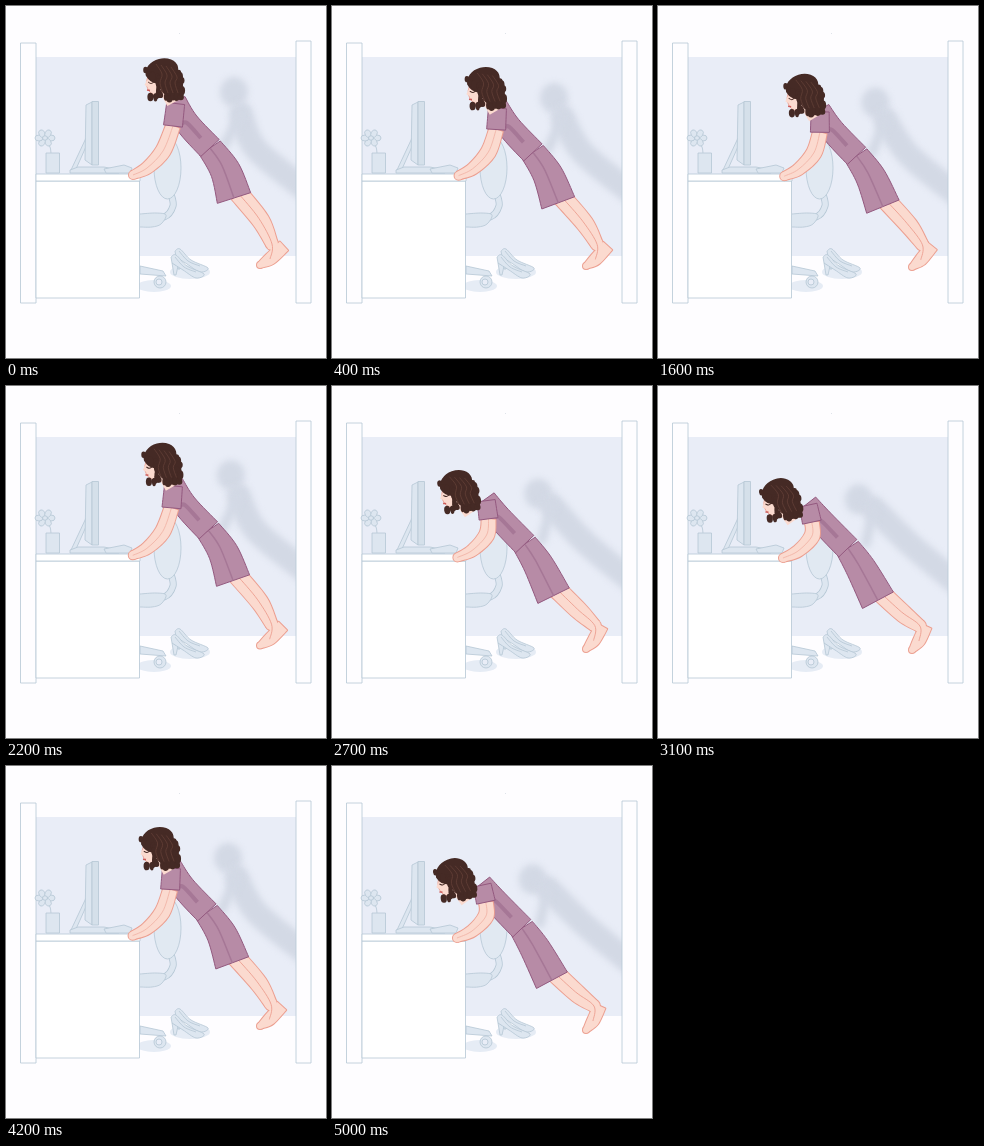
Write an HTML page with a canvas that moves like this. It is 320 by 352 pixels and loops after 5100 ms.

```html
<!DOCTYPE html>
<html lang="en">
<head>
<meta charset="utf-8">
<title>Desk push-ups</title>
<style>
html, body { margin: 0; width: 100%; height: 100%; overflow: hidden; background: #fefdff; }
canvas { display: block; width: 320px; height: 352px; }
</style>
</head>
<body>
<canvas id="stage"></canvas>
<script>
const canvas = document.getElementById('stage');
const ctx = canvas.getContext('2d');
const ratio = window.devicePixelRatio || 1;
canvas.width = 320 * ratio;
canvas.height = 352 * ratio;

const LOOP = 5100, STEP = 100, CYCLE = 1900, DOWN = 1100;
const PAPER = '#fefdff', WALL = '#e9edf7', LINE = '#b5c7d5', PALE = '#dde6f0';
const SKIN = '#fbdacf', SKIN_LINE = '#ec9f90';
const DRESS = '#b78ba6', DRESS_DARK = '#a67796', DRESS_LINE = '#93597f';
const HAIR = '#452a25', HAIR_LIGHT = '#664239';

// Each joint at the top and at the bottom of the push-up
const JOINTS = {
  collar: [[170, 95], [150, 117]],
  chest: [[181, 117], [164, 135]],
  waist: [[204, 142], [190, 162]],
  hip: [[219, 164], [203, 182]],
  hem: [[228, 192], [220, 214]],
  knee: [[233, 188], [222, 206]],
  calf: [[255, 215], [246, 228]],
  ankle: [[266, 238], [262, 240]],
  heel: [[278, 240], [268, 240]],
  ball: [[264, 253], [261, 255]],
  toe: [[254, 259], [254, 264]],
  sleeve: [[167, 120], [154, 136]],
  elbow: [[157, 145], [154, 150]],
  wrist: [[141, 162], [140, 165]],
  hand: [[127, 169], [125, 172]],
  shadeHead: [[228, 86], [201, 113]],
  shadeNeck: [[235, 108], [216, 122]],
  shadeHip: [[250, 143], [252, 158]],
  shadeFeet: [[300, 184], [300, 198]],
  shadeHand: [[218, 140], [208, 157]]
};

const mix = (a, b, d) => a.map((v, i) => v + (b[i] - v) * d);

// Slower on the way down, quicker on the way up
function depthAt(time) {
  const t = time % CYCLE;
  const part = t < DOWN ? t / DOWN : (t - DOWN) / (CYCLE - DOWN);
  const wave = Math.cos(Math.PI * part ** 1.17);
  return 1.03 * (t < DOWN ? 1 - wave : 1 + wave) / 2;
}

function seeded(seed) {
  return () => (seed = seed * 16807 % 2147483647) / 2147483647;
}

function paint(fill, stroke, width = .8) {
  if (fill) { ctx.fillStyle = fill; ctx.fill(); }
  if (stroke) { ctx.strokeStyle = stroke; ctx.lineWidth = width; ctx.stroke(); }
}

function poly(points, fill, stroke) {
  ctx.beginPath();
  points.forEach(p => ctx.lineTo(...p));
  ctx.closePath();
  paint(fill, stroke);
}

function oval(x, y, rx, ry, fill, stroke, turn = 0) {
  ctx.beginPath();
  ctx.ellipse(x, y, rx, ry, turn, 0, Math.PI * 2);
  paint(fill, stroke);
}

function box(x, y, w, h, fill, stroke) {
  ctx.beginPath();
  ctx.rect(x, y, w, h);
  paint(fill, stroke);
}

// Adds a smooth run through the points to the current path
function spline(points) {
  const at = i => points[Math.max(0, Math.min(points.length - 1, i))];
  ctx.lineTo(...points[0]);
  for (let i = 0; i < points.length - 1; i++) {
    const [a, b, c, d] = [at(i - 1), at(i), at(i + 1), at(i + 2)];
    ctx.bezierCurveTo(b[0] + (c[0] - a[0]) / 6, b[1] + (c[1] - a[1]) / 6,
      c[0] - (d[0] - b[0]) / 6, c[1] - (d[1] - b[1]) / 6, ...c);
  }
}

function line(points, stroke, width) {
  ctx.beginPath();
  spline(points);
  paint(null, stroke, width);
}

// Tapered band along a spine, given the half width at each point
function ribbon(spine, widths) {
  const left = [], right = [];
  spine.forEach(([x, y], i) => {
    const a = spine[Math.max(0, i - 1)], b = spine[Math.min(spine.length - 1, i + 1)];
    const dx = b[0] - a[0], dy = b[1] - a[1], k = widths[i] / Math.hypot(dx, dy);
    left.push([x + dy * k, y - dx * k]);
    right.unshift([x - dy * k, y + dx * k]);
  });
  const path = () => { ctx.beginPath(); spline(left); spline(right); ctx.closePath(); };
  return { path, tip: spine[spine.length - 1], size: widths[widths.length - 1] };
}

// Outlines all bands first so that they merge into one shape
function merge(bands, fill, stroke) {
  for (const pass of ['stroke', 'fill'])
    for (const band of bands) {
      const ink = pass === 'stroke' ? [null, stroke, 2] : [fill];
      band.path();
      paint(...ink);
      ctx.beginPath();
      ctx.arc(...band.tip, band.size, 0, Math.PI * 2);
      paint(...ink);
    }
}

function cloth(spine, widths) {
  ribbon(spine, widths).path();
  paint(DRESS, DRESS_LINE, 1);
}

function shadow(p) {
  const tone = '#d3d9e5';
  ctx.save();
  ctx.beginPath();
  ctx.rect(31, 51, 259, 199);
  ctx.clip();
  ctx.filter = `blur(${3 * ratio}px)`;
  ctx.lineCap = 'round';
  oval(...p.shadeHead, 14, 15, tone);
  line([p.shadeNeck, p.shadeHip, p.shadeFeet], tone, 24);
  line([p.shadeNeck, p.shadeHand], tone, 10);
  ctx.restore();
}

function chair() {
  oval(148, 280, 17, 6, '#e6ecf5');
  line([[165, 188], [167, 200], [158, 211], [134, 212]], LINE, 7);
  line([[165, 188], [167, 200], [158, 211], [134, 212]], PALE, 5.4);
  ctx.beginPath();
  spline([[134, 208], [150, 207], [160, 209], [155, 218], [146, 221], [134, 221]]);
  paint(PALE, LINE);
  oval(161.5, 162, 13.5, 31, '#e1e9f2', LINE);
  poly([[134, 260], [157, 265], [160, 270], [134, 268]], PALE, LINE);
  oval(154, 276, 6, 6, PALE, LINE);
  oval(153, 276, 3, 3, WALL, LINE);
}

function shoes() {
  oval(184, 266, 20, 7, '#e6ecf5');
  for (const shift of [4, 0]) {
    ctx.save();
    ctx.translate(shift, -shift * 1.5);
    poly([[166, 257], [168, 269], [170, 269], [172, 260]], PALE, LINE);
    ctx.beginPath();
    spline([[165, 251], [170, 249], [181, 260], [198, 268], [190, 272], [177, 264], [166, 257]]);
    ctx.closePath();
    paint(PALE, LINE);
    line([[169, 251], [178, 261], [190, 266]], LINE);
    ctx.restore();
  }
}

function desk() {
  box(14.5, 37, 15.5, 260, PAPER, LINE);
  box(30, 175, 103.5, 117, '#fff', LINE);
  box(30, 168, 104, 7, '#fff', LINE);
  poly([[65, 164], [80, 132], [83, 134], [70, 163]], PALE, LINE);
  poly([[64, 164], [72, 161], [98, 161], [113, 164], [113, 167], [64, 167]], PALE, LINE);
  poly([[80, 99], [86, 96], [86, 159], [79, 154]], PALE, LINE);
  box(86, 95.5, 6.5, 63.5, '#d5e0ea', LINE);
  poly([[98, 163], [118, 159], [126, 162], [124, 167], [100, 167]], PALE, LINE);
  line([[45, 148], [44, 141], [39, 133]], LINE);
  for (let k = 0; k < 6; k++) {
    const a = k * Math.PI / 3;
    oval(39 + Math.cos(a) * 6, 132 + Math.sin(a) * 5, 4, 3, PALE, LINE, a);
  }
  oval(39, 132, 2.4, 2.2, PALE, LINE);
  box(40, 147, 13.5, 20, PALE, LINE);
}

function room(p) {
  ctx.fillStyle = PAPER;
  ctx.fillRect(0, 0, 320, 352);
  ctx.fillStyle = '#dfe3ea';
  ctx.fillRect(173, 27, 1, 1);
  ctx.fillStyle = WALL;
  ctx.fillRect(30, 51, 260, 199);
  shadow(p);
  chair();
  shoes();
  desk();
  box(290, 35, 15, 262, PAPER, LINE);
}

function woman(p) {
  merge([
    ribbon([p.knee, p.calf, p.ankle], [9, 8.5, 6]),
    ribbon([p.heel, p.ball, p.toe], [6, 6, 3])
  ], SKIN, SKIN_LINE);
  line([p.knee, mix(p.calf, p.knee, .1), p.ankle, p.ball], SKIN_LINE, .9);

  cloth([p.waist, p.hip, p.hem], [12.5, 15, 17.5]);
  line([p.waist, mix(p.waist, p.hip, .8), p.hem], DRESS_DARK, 1.5);
  cloth([p.collar, p.chest, p.waist], [10, 12, 12.5]);
  line([mix(p.sleeve, p.chest, .6), p.chest, mix(p.chest, p.waist, .6)], DRESS_DARK, 4);

  merge([ribbon([p.sleeve, p.elbow, p.wrist, p.hand], [7, 7.5, 6, 4])], SKIN, SKIN_LINE);
  line([p.sleeve, p.elbow, p.wrist, p.hand], '#f3b9ac', 1);
  cloth([mix(p.collar, p.sleeve, .1), p.sleeve], [9, 9.5]);
}

function curls(from, to, count, random) {
  for (let k = 0; k < count; k++) {
    const [x, y] = mix(from, to, k / (count - 1));
    oval(x + random() * 3 - 1.5, y + random() * 3 - 1.5, 2 + random() * 1.6, 2.6 + random() * 2, HAIR);
  }
}

function head(d) {
  const random = seeded(77);
  const sway = 3.4 * Math.sin(2 * Math.PI * Math.min(d, 1));
  ctx.save();
  ctx.translate(158 - 34.5 * d + sway, 75 + 39.5 * d);
  ctx.rotate(-.13 * d);
  ctx.translate(-158, -75);
  line([[160, 84], [167, 97]], SKIN, 13);
  oval(149, 78, 8.5, 11, SKIN, SKIN_LINE, -.2);
  poly([[141, 74], [138.5, 79], [142, 81]], SKIN);
  line([[142, 76], [145, 77.5], [148, 76]], HAIR, 1);
  line([[141, 84], [144, 84.5]], '#cc5b59', 1.5);
  oval(156, 65, 16.5, 12.5, HAIR, null, -.25);
  oval(164, 75, 12.5, 17, HAIR, null, -.35);
  curls([141, 65], [150, 71], 4, random);
  curls([153, 72], [154, 90], 6, random);
  curls([154, 89], [145, 92], 4, random);
  curls([160, 92], [175, 90], 6, random);
  curls([172, 66], [176, 88], 6, random);
  for (let k = 0; k < 4; k++) {
    const x = 155 + k * 5;
    line([[x - 5, 58 + k], [x + 1, 68 + k], [x - 1, 77], [x + 2, 87]], HAIR_LIGHT, .7);
  }
  ctx.restore();
}

function draw(time) {
  const d = depthAt(Math.floor(time % LOOP / STEP) * STEP);
  const pose = {};
  for (const name in JOINTS) pose[name] = mix(...JOINTS[name], d);
  ctx.setTransform(ratio, 0, 0, ratio, 0, 0);
  ctx.lineJoin = 'round';
  room(pose);
  woman(pose);
  head(d);
}

const start = performance.now();
function tick() {
  draw(performance.now() - start);
  requestAnimationFrame(tick);
}
tick();
</script>
</body>
</html>
```
